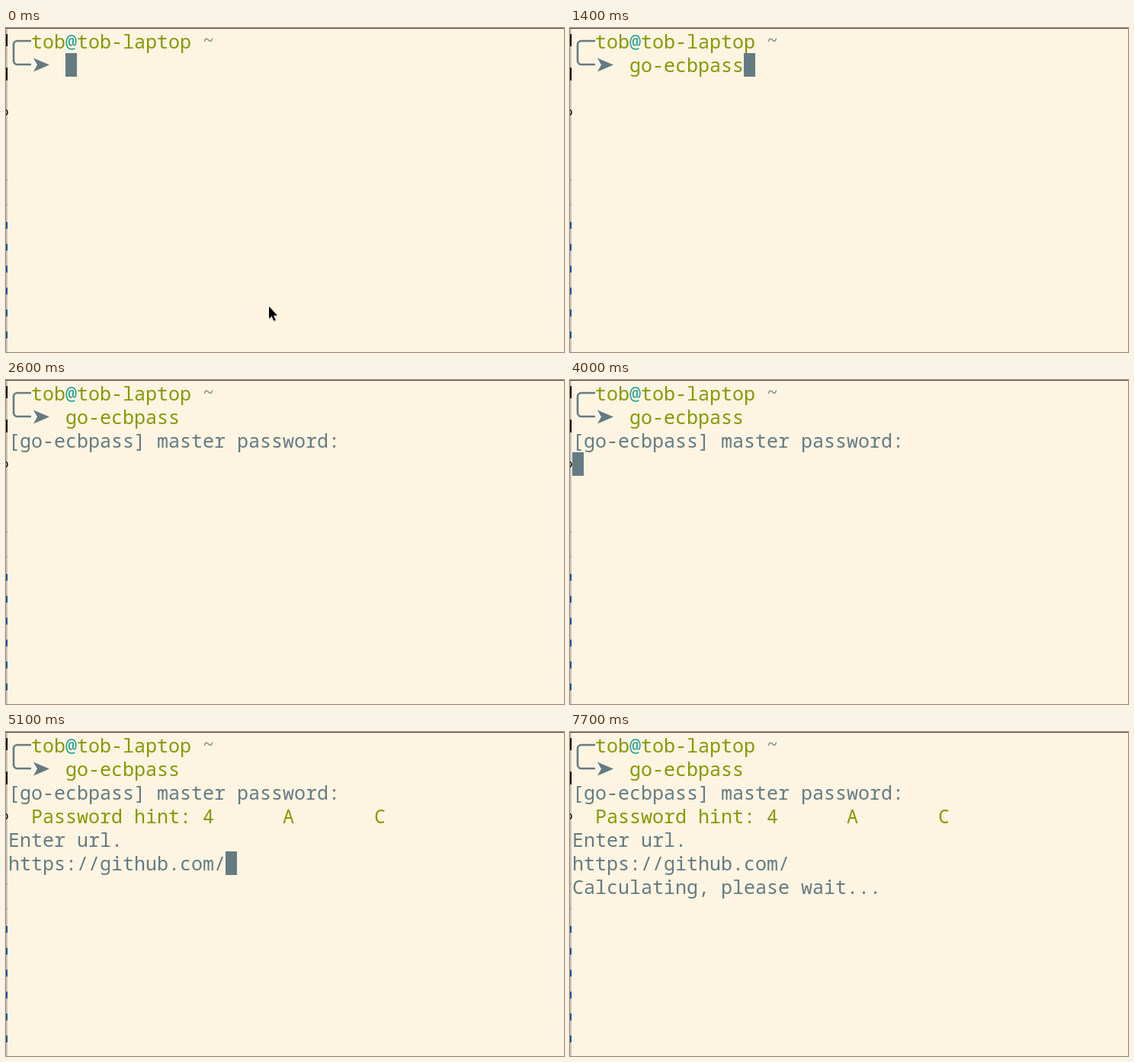
Animation, 732 px wide and 426 px high, one loop 8000 ms. Source, as an HTML page with a canvas:

```html
<!DOCTYPE html>
<html lang="en">
<head>
<meta charset="utf-8">
<title>Terminal session</title>
<style>
html, body { margin: 0; width: 732px; height: 426px; overflow: hidden; background: #fdf4e1; }
canvas { display: block; }
</style>
</head>
<body>
<canvas id="stage" width="732" height="426"></canvas>
<script>
const ctx = document.getElementById("stage").getContext("2d");
const LOOP = 8000, CELL = 15, ROW = 31, LEFT = 3, TOP = 2;
const PAPER = "#fdf4e1", GREY = "#657b83", GREEN = "#859900", TEAL = "#2aa198", BLACK = "#000";
const COMMAND = "go-ecbpass";

// Moments of the session, in ms
const KEY = 600, ACCEPT = 1400, OUTPUT = 2100, HINT = 4300, PASTE = 5100, CALC = 5900;
// Spans in which the block cursor is blinked off
const OFF = [[1200, ACCEPT], [2600, 3200], [6500, 7100], [7700, LOOP]];

function rect(color, x, y, w, h) {
  ctx.fillStyle = color;
  ctx.fillRect(x, y, w, h);
}

function text(str, col, row, color = GREY, lift = 0) {
  ctx.fillStyle = color;
  ctx.fillText(str, LEFT + col * CELL, TOP + row * ROW + 25 - lift);
}

function block(col, row, color = GREY) {
  rect(color, LEFT + col * CELL, TOP + row * ROW, CELL, ROW);
}

function polygon(points, color) {
  ctx.beginPath();
  points.forEach(([x, y]) => ctx.lineTo(x, y));
  ctx.closePath();
  ctx.fillStyle = color;
  ctx.fill();
}

function windowEdges() {
  rect(PAPER, 0, 0, 732, 426);
  rect("#cbc4ba", 0, 0, 2, 426);
  rect(BLACK, 0, 8, 2, 16);
  rect(BLACK, 0, 52, 2, 17);
  rect("#99938b", 0, 199, 2, 1);
  rect("#99938b", 0, 232, 2, 1);
  ctx.strokeStyle = BLACK;
  ctx.lineWidth = 1.5;
  ctx.beginPath();
  ctx.arc(-1.5, 111, 3.5, -1.4, 1.4);
  ctx.stroke();
  for (let i = 0; i < 6; i++) rect("#1f4f9c", 0, 255 + i * 28.8, 2, 9);
  rect("#47403a", 0, 0, 732, 1);
}

function prompt() {
  ctx.strokeStyle = GREY;
  ctx.lineWidth = 2.6;
  ctx.beginPath();
  ctx.moveTo(33, 17);
  ctx.arcTo(10, 17, 10, 48, 5);
  ctx.arcTo(10, 48, 33, 48, 5);
  ctx.lineTo(33, 48);
  ctx.stroke();
  polygon([[36, 39.5], [57, 48.5], [36, 57.5], [41, 48.5]], GREY);
  text("tob", 2, 0, GREEN);
  text("@", 5, 0, TEAL);
  text("tob-laptop", 6, 0, GREEN);
  text("~", 17, 0, "#7d8f93", 2);
}

function pointer() {
  const shape = [[345, 366], [345, 382], [348.6, 378.8], [351.2, 385], [353.6, 384], [351, 378], [355.8, 378]];
  ctx.save();
  ctx.shadowColor = "rgba(0,0,0,.3)";
  ctx.shadowBlur = 2;
  ctx.shadowOffsetX = ctx.shadowOffsetY = 1;
  polygon(shape, BLACK);
  ctx.restore();
  ctx.strokeStyle = "#fff";
  ctx.lineWidth = 1;
  ctx.stroke();
  polygon(shape, BLACK);
}

function commandLine(t, lit) {
  if (t < KEY) return;
  if (t >= ACCEPT) return text(COMMAND, 5, 1, GREEN);
  text(COMMAND[0], 5, 1, GREEN);
  text(COMMAND.slice(1), 6, 1, BLACK);
  if (lit) {
    block(6, 1, BLACK);
    text(COMMAND[1], 6, 1, PAPER);
  }
}

function output(t) {
  if (t >= OUTPUT) text("[go-ecbpass] master password:", 0, 2);
  if (t >= HINT) {
    text("Password hint: 4", 2, 3, GREEN);
    text("A", 24, 3, GREEN);
    text("C", 32, 3, GREEN);
    text("Enter url.", 0, 4);
  }
  if (t >= PASTE) text("https://github.com/", 0, 5);
  if (t >= CALC) text("Calculating, please wait...", 0, 6);
}

function cursorCell(t) {
  if (t >= CALC) return [27, 6];
  if (t >= PASTE) return [19, 5];
  if (t >= HINT) return [0, 5];
  if (t >= OUTPUT) return [0, 3];
  return t >= ACCEPT ? [15, 1] : [5, 1];
}

function draw(t) {
  const lit = !OFF.some(([a, b]) => t >= a && t < b);
  ctx.font = '25px "Noto Sans Mono", "DejaVu Sans Mono", monospace';
  windowEdges();
  prompt();
  commandLine(t, lit);
  output(t);
  if (lit && (t < KEY || t >= ACCEPT)) block(...cursorCell(t));
  if (t < KEY) pointer();
}

const start = performance.now();
function frame(now) {
  draw(Math.max(0, now - start) % LOOP);
  requestAnimationFrame(frame);
}
draw(0);
requestAnimationFrame(frame);
</script>
</body>
</html>
```
